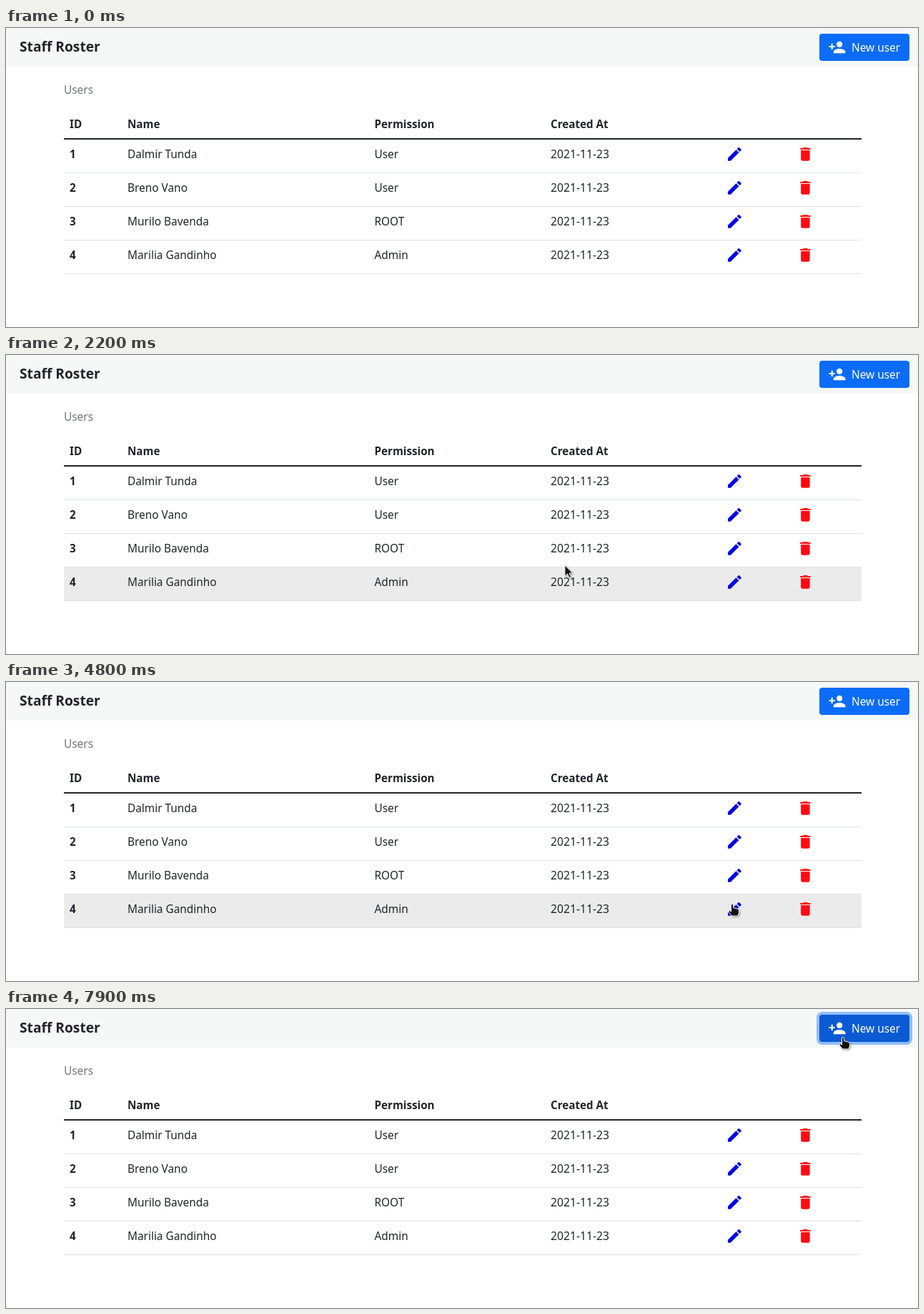
Write an HTML page that moves like this. It is 1276 px wide and 418 px high and loops after 8000 ms.

```html
<!DOCTYPE html>
<html lang="en">
<head>
<meta charset="utf-8">
<title>Users</title>
<style>
  html, body { margin: 0; width: 1276px; height: 418px; overflow: hidden; background: #fff; }
  svg { display: block; }
  text { font: 15.4px "Noto Sans", "Open Sans", sans-serif; fill: #212529; }
  .bold { font-weight: 700; font-size: 15.2px; }
  .title { font-weight: 700; font-size: 19.2px; }
  .date { font-size: 15.7px; }
  .muted { fill: #6c757d; }
  .white { fill: #fff; }
  .cursor { fill: #111; stroke: #fff; stroke-linejoin: round; filter: drop-shadow(1px 1px 1px #0006); }
</style>
</head>
<body>
<svg width="1276" height="418" viewBox="0 0 1276 418">
  <defs>
    <path id="pencil" fill="#0404e8" transform="scale(1.04) translate(-12 -12)" d="M3 17.25V21h3.75L17.81 9.94l-3.75-3.75zM20.71 7.04a1 1 0 000-1.41l-2.34-2.34a1 1 0 00-1.41 0l-1.83 1.83 3.75 3.75z"/>
    <path id="trash" fill="#ff0a12" transform="scale(1.04) translate(-12 -12)" d="M6 19c0 1.1.9 2 2 2h8c1.1 0 2-.9 2-2V7H6zM19 4h-3.5l-1-1h-5l-1 1H5v2h14z"/>
  </defs>
  <rect width="1276" height="54" fill="#f6f8f8"/>
  <text class="title" x="19" y="33">Staff Roster</text>
  <rect id="ring" x="1134" y="4" width="134" height="46" rx="8" fill="#3184fd" fill-opacity=".5"/>
  <rect id="button" x="1138" y="8" width="126" height="38" rx="4"/>
  <path class="white" transform="translate(1150.5 14.5) scale(1.04)" d="M15 12a4 4 0 100-8 4 4 0 000 8zM6 10V7H4v3H1v2h3v3h2v-3h3v-2zm9 4c-2.67 0-8 1.34-8 4v2h16v-2c0-2.66-5.33-4-8-4z"/>
  <text class="white" x="1183" y="33">New user</text>
  <text class="muted" x="81" y="92">Users</text>
  <rect id="hover" x="81" width="1116" height="46" fill="#ebebeb"/>
  <g id="table"><rect x="81" y="154" width="1116" height="2" fill="#212529"/></g>
  <path id="arrow" class="cursor" stroke-width=".8" d="M0 0V15L3.5 11.8 6 17.4 8.4 16.4 6 11H10.5Z"/>
  <path id="hand" class="cursor" stroke-width="1" d="M-1.5 1.2Q0-.8 1.5 1.2V5.6L8 7.2Q9.5 7.7 9.5 9.5V12.5L8 17H-.5L-5 11.5Q-5.4 9.6-3.4 9.7L-1.5 11Z"/>
</svg>
<script>
const LOOP = 8000, STEP = 100, CLICK = 7600;
const TABLE_TOP = 156, ROW = 47, HIT_OFFSET = 13;
const COLUMNS = [89, 170, 515.5, 762];
const ICONS = { pencil: 1019.4, trash: 1118.4 };
const users = [
  ['Dalmir Tunda', 'User'],
  ['Breno Vano', 'User'],
  ['Murilo Bavenda', 'ROOT'],
  ['Marilia Gandinho', 'Admin']
];

// Resting and turning points of the pointer: time, x, y
const path = [
  [800, 640, 358], [900, 648, 326], [1600, 662, 176], [1900, 667, 190],
  [2400, 905, 345], [2800, 1182, 217], [3300, 1125, 53], [4000, 1017, 198],
  [4200, 1016, 310], [4800, 1016, 310], [5300, 1114, 318], [5700, 1114, 318],
  [6200, 1016, 312], [6600, 1112, 316], [6700, 1098, 187], [7100, 1166, 42],
  [7900, 1171, 39]
];

const $ = id => document.getElementById(id);
const show = (id, on) => $(id).setAttribute('visibility', on ? 'visible' : 'hidden');
const middle = row => TABLE_TOP + row * ROW + 20.3;

function line(cells, y, classes) {
  return cells.map((cell, i) =>
    `<text class="${classes[i]}" x="${COLUMNS[i]}" y="${y}">${cell}</text>`).join('');
}

function tableRow([name, role], i) {
  const top = TABLE_TOP + i * ROW;
  const icons = Object.entries(ICONS).map(([id, x]) => `<use href="#${id}" x="${x}" y="${middle(i)}"/>`);
  return line([i + 1, name, role, '2021-11-23'], top + 26, ['bold', '', '', 'date']) + icons.join('') +
    `<rect x="81" y="${top + 46}" width="1116" height="1" fill="#dee2e6"/>`;
}

$('table').innerHTML += line(['ID', 'Name', 'Permission', 'Created At'], 140, Array(4).fill('bold')) +
  users.map(tableRow).join('');

// Monotone cubic through the path: eases at turns, never overshoots
function slope(i, axis) {
  const rate = j => (path[j + 1][axis] - path[j][axis]) / (path[j + 1][0] - path[j][0]);
  if (i === 0 || i === path.length - 1) return 0;
  const before = rate(i - 1), after = rate(i);
  return before * after > 0 ? 2 * before * after / (before + after) : 0;
}

function position(t, axis) {
  const next = path.findIndex(point => point[0] > t);
  if (next < 0) return path.at(-1)[axis];
  const i = Math.max(next - 1, 0), a = path[i], b = path[i + 1];
  const span = b[0] - a[0], k = Math.max(0, (t - a[0]) / span), rest = 1 - k;
  return a[axis] * rest * rest * (1 + 2 * k) + b[axis] * k * k * (3 - 2 * k) +
    span * k * rest * (slope(i, axis) * rest - slope(i + 1, axis) * k);
}

function draw(now) {
  const t = Math.floor(now % LOOP / STEP) * STEP;
  const [x, y] = [1, 2].map(axis => Math.round(position(t, axis)));
  const visible = t >= path[0][0];
  const row = Math.floor((y + HIT_OFFSET - TABLE_TOP) / ROW);
  const onRow = visible && row in users;
  const onIcon = onRow && Math.abs(y - middle(row)) < 12 &&
    Object.values(ICONS).some(cx => Math.abs(x - cx) < 12);
  const onButton = visible && x > 1138 && y < 46;
  const hand = onIcon || onButton;

  show('hover', onRow);
  $('hover').setAttribute('y', TABLE_TOP + row * ROW);
  $('button').setAttribute('fill', onButton ? '#0a5bd3' : '#0b6cf7');
  show('ring', t >= CLICK);
  show('arrow', visible && !hand);
  show('hand', visible && hand);
  for (const id of ['arrow', 'hand']) $(id).setAttribute('transform', `translate(${x} ${y})`);
}

function tick() {
  draw(performance.now());
  requestAnimationFrame(tick);
}
tick();
</script>
</body>
</html>
```
